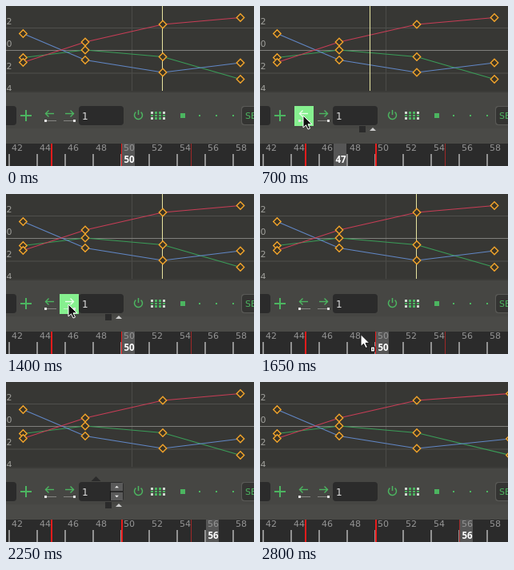
These frames come from a looping animation (310x200 px, 3.05 s). An HTML page with a canvas:

```html
<!DOCTYPE html>
<html>
<head>
<meta charset="utf-8">
<style>
html, body { margin: 0; width: 100%; height: 100%; overflow: hidden; background: #444; }
canvas { display: block; }
</style>
</head>
<body>
<canvas id="stage" width="310" height="200"></canvas>
<script>
const c = document.getElementById('stage').getContext('2d');
const LOOP = 3050, STEP = 50, GREEN = '#4cb560';

// Pointer path: time, x, y
const path = [
  [50, 112, 196], [200, 97, 187], [250, 94.5, 185], [300, 94.5, 185],
  [550, 47, 152], [600, 52, 142], [700, 54, 137], [850, 54, 137],
  [1050, 153, 181.5], [1100, 153, 181.5], [1300, 64, 154], [1400, 78, 138],
  [1500, 78, 138], [1650, 126, 175.5], [1850, 256, 181], [2050, 256, 181],
  [2250, 133, 140], [2500, 77, 138], [2650, 78, 138], [2750, 92, 180]
];

const curves = [
  ['#3a9d58', [64.5, 55, 63.5, 91.5]],
  ['#6187c6', [34.5, 67.5, 83, 71]],
  ['#c83d56', [70.5, 45, 23, 14.5]]
];

const graphX = f => 196 + (f - 50) * 19.4;
const rulerX = f => 144 + (f - 50) * 17.5;

function rect(x, y, w, h, color) {
  c.fillStyle = color;
  c.fillRect(x, y, w, h);
}

function round(x, y, w, h, r, color) {
  c.fillStyle = color;
  c.beginPath();
  c.roundRect(x, y, w, h, r);
  c.fill();
}

function line(points, color, width = 1) {
  c.strokeStyle = color;
  c.lineWidth = width;
  c.beginPath();
  points.forEach(p => c.lineTo(...p));
  c.stroke();
}

function poly(points, fill, stroke, width = 1) {
  c.beginPath();
  points.forEach(p => c.lineTo(...p));
  c.closePath();
  c.fillStyle = fill;
  c.fill();
  if (!stroke) return;
  c.strokeStyle = stroke;
  c.lineWidth = width;
  c.stroke();
}

function triangle(x, y, r, color, dir = 1) {
  poly([[x - r, y + dir * r / 2], [x, y - dir * r / 2], [x + r, y + dir * r / 2]], color);
}

function text(s, x, y, color, align = 'center', font = '11px "DejaVu Sans"') {
  c.font = `${font}, sans-serif`;
  c.textAlign = align;
  c.fillStyle = color;
  c.fillText(s, x, y);
}

function pointerAt(t) {
  if (t < path[0][0] || t > path[path.length - 1][0]) return null;
  const i = Math.max(1, path.findIndex(p => p[0] >= t));
  const [a, b] = [path[i - 1], path[i]];
  const k = (t - a[0]) / (b[0] - a[0]);
  return [a[1] + (b[1] - a[1]) * k, a[2] + (b[2] - a[2]) * k];
}

function drawGraph(keys, now) {
  rect(0, 0, 310, 106, '#373734');
  for (const y of [27.5, 84]) line([[0, y], [310, y]], '#50504d');
  line([[157.5, 0], [157.5, 106]], '#4b4b48');
  line([[0, 55.5], [310, 55.5]], '#80807c');
  ['2', '0', '2', '4'].forEach((s, i) => text(s, 0.5, 23 + i * 28, '#a0a09c', 'left'));

  const dots = curves.map(([color, ys]) => {
    const points = ys.map((y, i) => [graphX(keys[i]), y]);
    line(points, color, 1.1);
    return points;
  }).flat();
  rect(Math.floor(graphX(now) - 0.5), 0, 1, 106, '#e8e4a0');
  for (const [x, y] of dots)
    poly([[x - 4.7, y], [x, y - 4.7], [x + 4.7, y], [x, y + 4.7]], '#3a3427', '#f3a52c', 1.4);
}

function drawArrow(x, dir, hover) {
  if (hover) rect(x - 12, 125, 24, 25, '#86f08f');
  const color = hover ? '#e8ffe9' : GREEN;
  line([[x - dir * 5, 134.5], [x + dir * 5.5, 134.5]], color, 1.4);
  line([[x + dir * 1.5, 130.5], [x + dir * 5.5, 134.5], [x + dir * 1.5, 138.5]], color, 1.4);
  line([[x - 7, 143.5], [x + 8, 143.5]], hover ? '#c8f5cb' : '#858582');
  rect(x + dir * 6 - 1, 142, 3, 3, '#e4e4e4');
}

function drawToolbar(pointer) {
  const [px, py] = pointer || [-1, -1];
  const over = (x1, x2) => px >= x1 && px < x2 && py > 125 && py < 147;

  rect(0, 106, 310, 66, '#464643');
  rect(0, 106, 310, 2, '#3c3c39');
  rect(0, 153, 310, 19, '#4a4a47');
  round(-10, 125, 23, 24, 4, '#2b2b2b');
  line([[18, 137], [32, 137]], GREEN, 2);
  line([[25, 130], [25, 144]], GREEN, 2);
  drawArrow(55, -1, over(43, 67));
  drawArrow(79, 1, over(67, 91));

  round(91, 125, 56, 24, 4, '#2b2b2b');
  text('1', 95, 142, '#ddd', 'left', '12px "DejaVu Sans"');
  if (over(91, 147)) {
    triangle(112.5, 121, 6, '#2b2b2b');
    rect(131, 126, 15, 10, '#5a5a5a');
    rect(131, 138, 15, 10, '#5a5a5a');
    triangle(138.5, 131, 2.5, '#eee');
    triangle(138.5, 143, 2.5, '#eee', -1);
    line([[130.5, 136], [130.5, 148]], '#111');
  }
  if (pointer && py < 158) {
    rect(124, 150, 8, 8, '#2b2b2b');
    triangle(141, 154, 4, '#ccc');
  }

  c.strokeStyle = GREEN;
  c.lineWidth = 1.5;
  c.beginPath();
  c.arc(165.5, 136.5, 5, -0.9, Math.PI + 0.9);
  c.stroke();
  line([[165.5, 130], [165.5, 136]], GREEN, 1.5);

  for (let i = 0; i < 4; i++) {
    const x = 181 + i * 5;
    const color = i % 3 ? GREEN : '#cfd8d0';
    rect(x, 132, 3, 3, color);
    rect(x, 136, 3, 2, GREEN);
    rect(x, 139, 3, 3, color);
  }

  rect(218, 134, 6, 6, GREEN);
  for (const x of [241, 262, 283]) rect(x, 136, 2, 2, GREEN);
  round(294, 125, 30, 24, 4, '#5a5a57');
  round(295, 126, 30, 22, 4, '#343432');
  text('SE', 299, 141, GREEN, 'left');
}

function drawRuler(keys, now) {
  rect(0, 172, 310, 28, '#2b2b2b');
  for (let f = 42; f <= 58; f += 2) rect(rulerX(f) - 1, 185, 2, 15, '#929292');
  for (const f of keys.slice(1)) {
    const bright = f === 45 || f === 50;
    rect(Math.floor(rulerX(f)), 172, bright ? 2 : 1, 28, bright ? '#e81c1c' : '#a02828');
  }
  const x = Math.floor(rulerX(now)) + 1;
  rect(x, 172, 16, 28, '#565656');
  for (let f = 42; f <= 58; f += 2) text(f, rulerX(f) + 10, 181, '#959595');
  text(now, x + 9, 196, '#fff', 'center', 'bold 11.5px "Open Sans"');
}

function drawPointer([x, y]) {
  if (y > 125 && y < 147 && x >= 91 && x < 147) return;
  const scrub = y > 171;
  const shape = [[0, 0], [0, 15], [3.5, 11.8], [6, 17], [8.5, 16], [6, 10.8], [10.8, 10.8]];
  const [fill, edge] = scrub ? ['#fff', '#111'] : ['#111', '#fff'];
  poly(shape.map(([a, b]) => [x + a, y + b]), fill, edge);
  if (!scrub) return;
  rect(x + 12, y + 15, 6, 7, '#111');
  rect(x + 13, y + 16, 4, 5, '#fff');
  rect(x + 14, y + 18, 2, 1, '#111');
}

function draw(t) {
  const now = t < 200 ? 50 : t < 1100 ? 47 : t < 2050 ? 50 : 56;
  const keys = [41, 45, t >= 750 && t < 1400 ? 47 : 50, t >= 2600 ? 56 : 55];
  const pointer = pointerAt(t);
  drawGraph(keys, now);
  drawToolbar(pointer);
  drawRuler(keys, now);
  if (pointer) drawPointer(pointer);
}

const start = performance.now();
function tick() {
  const t = (performance.now() - start) % LOOP;
  draw(Math.min(2800, Math.floor(t / STEP) * STEP));
  requestAnimationFrame(tick);
}
tick();
</script>
</body>
</html>
```
